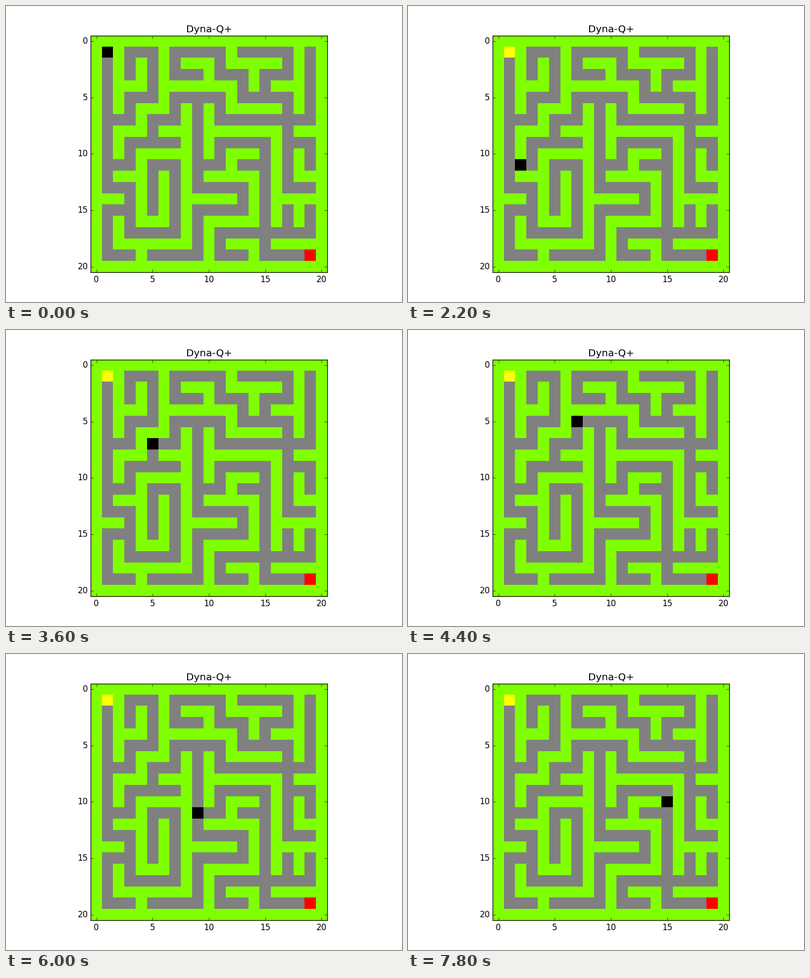
A matplotlib script that plays this animation: 800 px wide and 597 px high, repeating every 8000 ms.

```python
import matplotlib.pyplot as plt
import numpy as np
from matplotlib.animation import FuncAnimation
from matplotlib.colors import ListedColormap

plt.style.use("classic")
plt.rcParams["font.family"] = "DejaVu Sans"

SIZE = 21
FRAMES, INTERVAL = 40, 200
WALL, FLOOR, START, GOAL, AGENT = range(5)
COLORS = ["#7fff00", "#808080", "#ffff00", "#ff0000", "#000000"]
STEPS = {"U": (0, -1), "D": (0, 1), "L": (-1, 0), "R": (1, 0)}

# Each corridor: start column, start row, then moves.
ROUTE = (1, 1, "D10 R2 U2 R2 U2 R2 U2 R2 D6 R2 U2 R4 D10 R4")
BRANCHES = [
    (1, 11, "D2 R2 D4 R4 U6 L2 D4"),
    (3, 15, "L2 D4 R2"),
    (1, 7, "R2 U2 R2 U4 L2 D2"),
    (5, 9, "R2"),
    (9, 5, "R2 D2 R8 U6"),
    (17, 7, "U2 L4 U2 L2 U2 L4 D2 R2"),
    (15, 5, "U2 R2 U2 L4"),
    (17, 7, "D6 R2"),
    (17, 9, "R2 D2"),
    (15, 11, "L2"),
    (9, 11, "D2 R4 D2 L4 D4 L4"),
    (15, 17, "L4 D2 R2"),
    (15, 17, "R4 U2"),
    (17, 17, "U2"),
]


def walk(x, y, moves):
    """Return every cell visited, as (row, column)."""
    cells = [(y, x)]
    for move in moves.split():
        dx, dy = STEPS[move[0]]
        for _ in range(int(move[1:])):
            x, y = x + dx, y + dy
            cells.append((y, x))
    return cells


path = walk(*ROUTE)
maze = np.full((SIZE, SIZE), WALL)
for corridor in [ROUTE] + BRANCHES:
    for cell in walk(*corridor):
        maze[cell] = FLOOR
maze[path[0]] = START
maze[path[-1]] = GOAL

fig = plt.figure(figsize=(8, 5.97), dpi=100, facecolor="white")
ax = fig.add_axes([0.125, 0.1, 0.775, 0.8])
image = ax.imshow(maze, cmap=ListedColormap(COLORS), vmin=-0.5, vmax=4.5,
                  interpolation="nearest")
ax.set_xticks(range(0, SIZE, 5))
ax.set_yticks(range(0, SIZE, 5))
ax.set_xlim(-0.5, SIZE - 0.5)
ax.set_ylim(SIZE - 0.5, -0.5)
ax.set_title("Dyna-Q+")


def draw(i):
    grid = maze.copy()
    grid[path[i]] = AGENT
    image.set_data(grid)
    return [image]


anim = FuncAnimation(fig, draw, frames=FRAMES, interval=INTERVAL,
                     repeat=True, repeat_delay=0)
plt.show()
```
